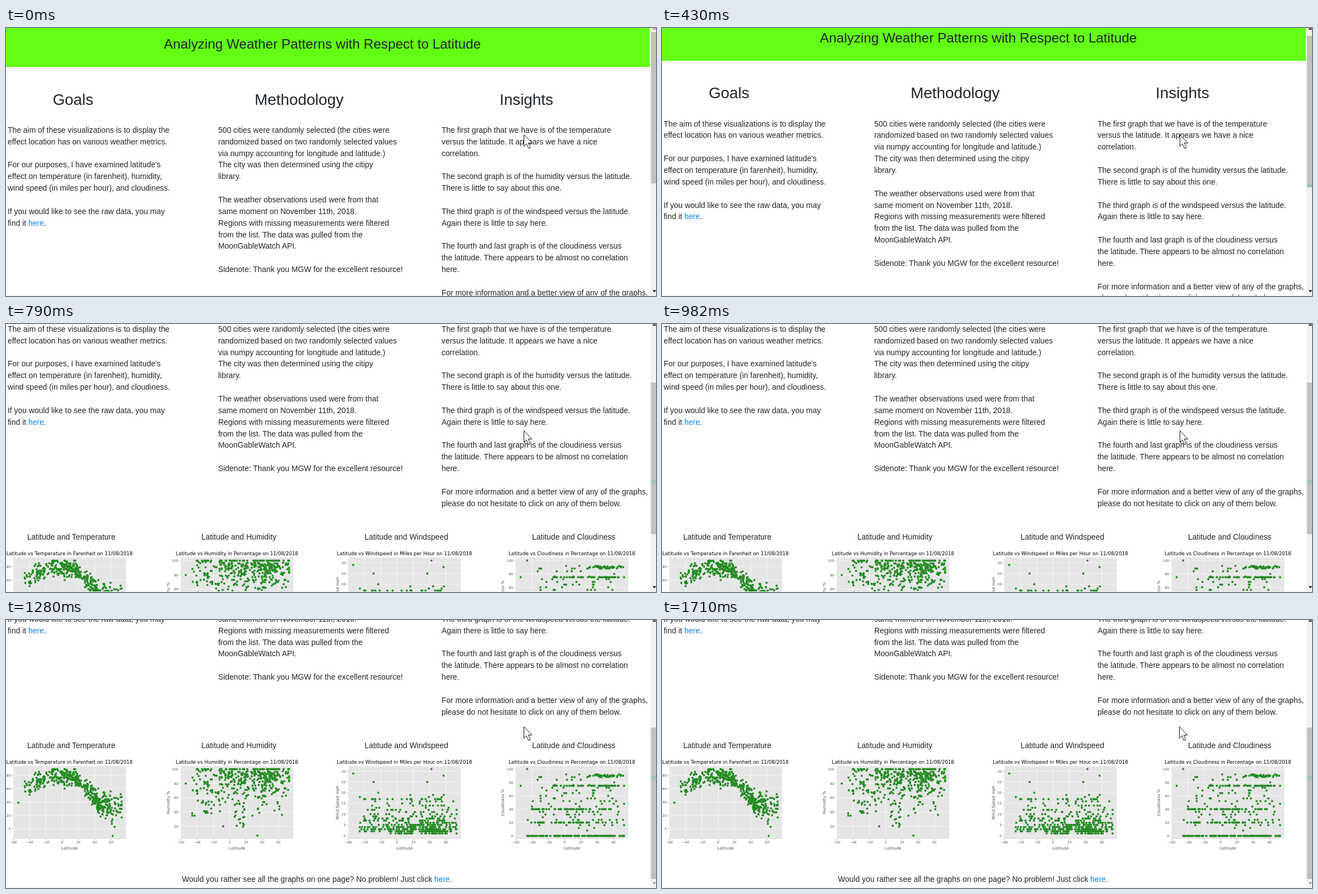
An HTML page for the animation above (1.79 s loop, 1164 px wide and 481 px high).

```html
<!DOCTYPE html>
<html lang="en">
<head>
<meta charset="utf-8">
<title>Weather and latitude</title>
<style>
  @property --scroll { syntax: "<length>"; inherits: true; initial-value: 0px; }
  html, body { margin: 0; width: 100%; height: 100%; overflow: hidden; background: #fff; }
  #stage {
    position: relative; width: 1164px; height: 481px; overflow: hidden;
    font: 13.91px/20.86px "Liberation Sans", Arial, sans-serif; color: #212529;
    animation: scroll 1790ms step-end infinite;
  }
  #page { position: absolute; left: 0; top: calc(-1 * var(--scroll)); width: 1153px; height: 840px; }
  #page > * { position: absolute; margin: 0; white-space: pre; font-weight: 400; }
  header { left: 0; top: 0; width: 1153px; height: 70px; background: #62ff14; }
  h1, h2, h3 { width: 700px; margin-left: -350px !important; text-align: center; }
  h1 { top: 13.9px; left: 566.5px; font-size: 24.34px; line-height: 29.2px; }
  h2 { top: 111.7px; font-size: 27.82px; line-height: 33.4px; }
  h3 { top: 546.3px; font-size: 13.91px; line-height: 20.86px; }
  .col { top: 172.9px; }
  .link { color: #0e82e4; }
  svg { position: absolute; left: 0; top: 0; overflow: hidden; }
  #page svg text { font-family: "DejaVu Sans", sans-serif; }

  #bar { position: absolute; left: 1154px; top: 0; width: 10px; height: 481px; background: #f1f1f1; }
  #bar div { position: absolute; left: 1px; width: 9px; }
  #thumb { top: calc(7.4px + .56 * var(--scroll)); height: 272px; background: #c1c1c1; }
  #mark { top: 280px; height: 6px; background: #a4bfca; animation: mark 1790ms step-end infinite; }
  #up { animation: up 1790ms step-end infinite; }
  #down { animation: down 1790ms step-end infinite; }
  #edge { position: absolute; left: 0; top: 480px; width: 1164px; height: 1px; background: #eaeef0; }
  #cursor { left: 920px; top: 185px; animation: nudge 1790ms step-end infinite; }

  @keyframes scroll {
    0% { --scroll: 0px; }
    24.022% { --scroll: 11.3px; }
    35.196% { --scroll: 162.5px; }
    44.134% { --scroll: 174px; }
    62.011% { --scroll: 276px; }
    71.508%, 100% { --scroll: 331px; }
  }
  @keyframes mark { 0% { opacity: 0; } 24.022%, 100% { opacity: 1; } }
  @keyframes up { 0% { fill: #a3a3a3; } 24.022%, 100% { fill: #404040; } }
  @keyframes down { 0% { fill: #202020; } 71.508%, 100% { fill: #a3a3a3; } }
  @keyframes nudge { 0% { left: 920px; } 95.531%, 100% { left: 919px; } }
</style>
</head>
<body>
<div id="stage">
  <div id="page">
    <header></header>
    <h1>Analyzing Weather Patterns with Respect to Latitude</h1>
    <h2 style="left:120px">Goals</h2>
    <h2 style="left:525px">Methodology</h2>
    <h2 style="left:932px">Insights</h2>
    <p class="col" style="left:3px">The aim of these visualizations is to display the
effect location has on various weather metrics.

For our purposes, I have examined latitude's
effect on temperature (in farenheit), humidity,
wind speed (in miles per hour), and cloudiness.

If you would like to see the raw data, you may
find it <span class="link">here</span>.</p>
    <p class="col" style="left:380px">500 cities were randomly selected (the cities were
randomized based on two randomly selected values
via numpy accounting for longitude and latitude.)
The city was then determined using the citipy
library.

The weather observations used were from that
same moment on November 11th, 2018.
Regions with missing measurements were filtered
from the list. The data was pulled from the
MoonGableWatch API.

Sidenote: Thank you MGW for the excellent resource!</p>
    <p class="col" style="left:780px">The first graph that we have is of the temperature
versus the latitude. It appears we have a nice
correlation.

The second graph is of the humidity versus the latitude.
There is little to say about this one.

The third graph is of the windspeed versus the latitude.
Again there is little to say here.

The fourth and last graph is of the cloudiness versus
the latitude. There appears to be almost no correlation
here.

For more information and a better view of any of the graphs,
please do not hesitate to click on any of them below.</p>
    <h3 style="left:117px">Latitude and Temperature</h3>
    <h3 style="left:417px">Latitude and Humidity</h3>
    <h3 style="left:717px">Latitude and Windspeed</h3>
    <h3 style="left:1016.7px">Latitude and Cloudiness</h3>
    <svg id="charts" width="1153" height="780"></svg>
    <p style="left:315px;top:785.8px">Would you rather see all the graphs on one page? No problem! Just click <span class="link">here</span>.</p>
  </div>
  <div id="bar">
    <div id="thumb"></div>
    <div id="mark"></div>
    <svg width="10" height="481">
      <path id="up" d="M3 3L7 -1L11 3Z"/>
      <path id="down" d="M3.5 470.5H10.5L7 474.5Z"/>
    </svg>
  </div>
  <div id="edge"></div>
  <svg id="cursor" width="30" height="36">
    <path d="M7.5 6.5V27L12 22.8L15.8 31.3L19 29.9L15.3 21.5H21.8Z" fill="#fff" stroke="#111"/>
  </svg>
</div>
<script>
const svg = document.getElementById('charts');
const TOP = 593.2, BOTTOM = 724, DEG = 1.458;

let seed = 2018;
const rnd = () => (seed = seed * 16807 % 2147483647) / 2147483647;
const range = (a, b) => a + (b - a) * rnd();
const bell = () => (rnd() + rnd() + rnd() - 1.5) * 2;
const expo = mean => -mean * Math.log(1 - rnd());
const clamp = (v, a, b) => Math.max(a, Math.min(b, v));

function add(tag, attrs, text) {
  const el = document.createElementNS('http://www.w3.org/2000/svg', tag);
  for (const k in attrs) el.setAttribute(k, attrs[k]);
  if (text) el.textContent = text;
  svg.append(el);
}
function label(x, y, size, text, extra) {
  add('text', { x, y, 'font-size': size, 'text-anchor': 'middle', fill: '#555', ...extra }, text);
}

// Southern, tropical and northern cities
function latitude() {
  const r = rnd();
  if (r < .18) return clamp(-27 + 9 * bell(), -46, -8);
  if (r < .5) return range(-14, 22);
  return clamp(46 + 13 * bell(), 18, 73);
}
function temperature(lat) {
  const mean = 79 - 50 / (1 + Math.exp((35 - lat) / 8)) - .5 * Math.max(0, -12 - lat);
  const spread = 6.5 + .14 * Math.max(0, lat - 30);
  return clamp(mean + spread * bell(), -11, 89);
}
function humidity(lat) {
  if (rnd() < .12) return 100;
  if (lat < -12) return clamp(72 + 20 * bell(), 20, 98);
  if (lat > 6 && lat < 18 && rnd() < .35) return range(16, 58);
  return Math.round(Math.max(97 - expo(17), range(15, 50)));
}
function wind(lat) {
  if (rnd() < .03) return Math.round(range(16, 20));
  return Math.round(clamp(lat < -12 ? 2 + expo(6.5) : 1 + expo(4.7), 1, 17));
}
function clouds(lat) {
  const r = rnd();
  if (r < .33) return 0;
  if (r < .46) return lat < -20 ? 40 : 75;
  if (r < .66 && lat > 28) return 90 + Math.round(bell());
  if (r < .72) return rnd() < .5 ? 20 : 40;
  return 4 * Math.floor(range(2, 24));
}

const cities = Array.from({ length: 460 }, latitude);

function chart(i, o) {
  const mid = 100.7 + 299.9 * i, left = mid - 88, right = mid + 114;
  const X = lat => mid + lat * DEG, Y = v => o.zero - v * o.unit;
  add('rect', { x: left, y: TOP, width: right - left, height: BOTTOM - TOP, fill: '#e5e5e5' });
  let grid = '', ticks = '';
  for (let lat = -60; lat <= 60; lat += 20) {
    grid += `M${X(lat)} ${TOP}V${BOTTOM}`;
    ticks += `M${X(lat)} ${BOTTOM}v2.1`;
    label(X(lat), 732.4, 6.03, String(lat).replace('-', '\u2212'));
  }
  for (let v = o.from; v <= o.to; v += o.step) {
    grid += `M${left} ${Y(v)}H${right}`;
    ticks += `M${left} ${Y(v)}h-2.1`;
    label(left - 4.2, Y(v) + 2.2, 6.03, String(v), { 'text-anchor': 'end' });
  }
  add('path', { d: grid, stroke: '#fff', 'stroke-width': .6 });
  add('path', { d: ticks, stroke: '#555', 'stroke-width': .5 });
  const points = cities.map(lat => [lat, o.rule(lat)]).concat(o.extremes);
  add('path', {
    d: points.map(([lat, v]) => `M${X(lat).toFixed(1)} ${Y(v).toFixed(1)}h0`).join(''),
    stroke: '#228b22', 'stroke-width': 3.9, 'stroke-linecap': 'round'
  });
  label(mid + 13, 589.2, 8.7, `Latitude vs ${o.title} on 11/08/2018`, { fill: '#000' });
  label(mid + 13, 743, 7.23, 'Latitude');
  const x = mid - o.side;
  label(x, 658.6, 7.23, o.axis, { transform: `rotate(-90 ${x} 658.6)` });
}

chart(0, {
  title: 'Temperature in Farenheit', axis: 'Temperature (F)', side: 109,
  zero: 705.5, unit: 1.2, from: 0, to: 80, step: 20,
  rule: temperature, extremes: [[-54, 39], [62, -11]]
});
chart(1, {
  title: 'Humidity in Percentage', axis: 'Humidity %', side: 107.5,
  zero: 727, unit: 1.283, from: 20, to: 100, step: 20,
  rule: humidity, extremes: [[-54, 80], [34, 7]]
});
chart(2, {
  title: 'Windspeed in Miles per Hour', axis: 'Wind Speed mph', side: 104.5,
  zero: 718, unit: 3.85, from: 0, to: 30, step: 5,
  rule: wind, extremes: [[-54, 29], [-29, 25], [37, 25], [42, 31], [57, 28]]
});
chart(3, {
  title: 'Cloudiness in Percentage', axis: 'Cloudiness %', side: 108.5,
  zero: 718.5, unit: 1.2, from: 0, to: 100, step: 20,
  rule: clouds, extremes: [[-54, 75], [-46, 100]]
});
</script>
</body>
</html>
```
